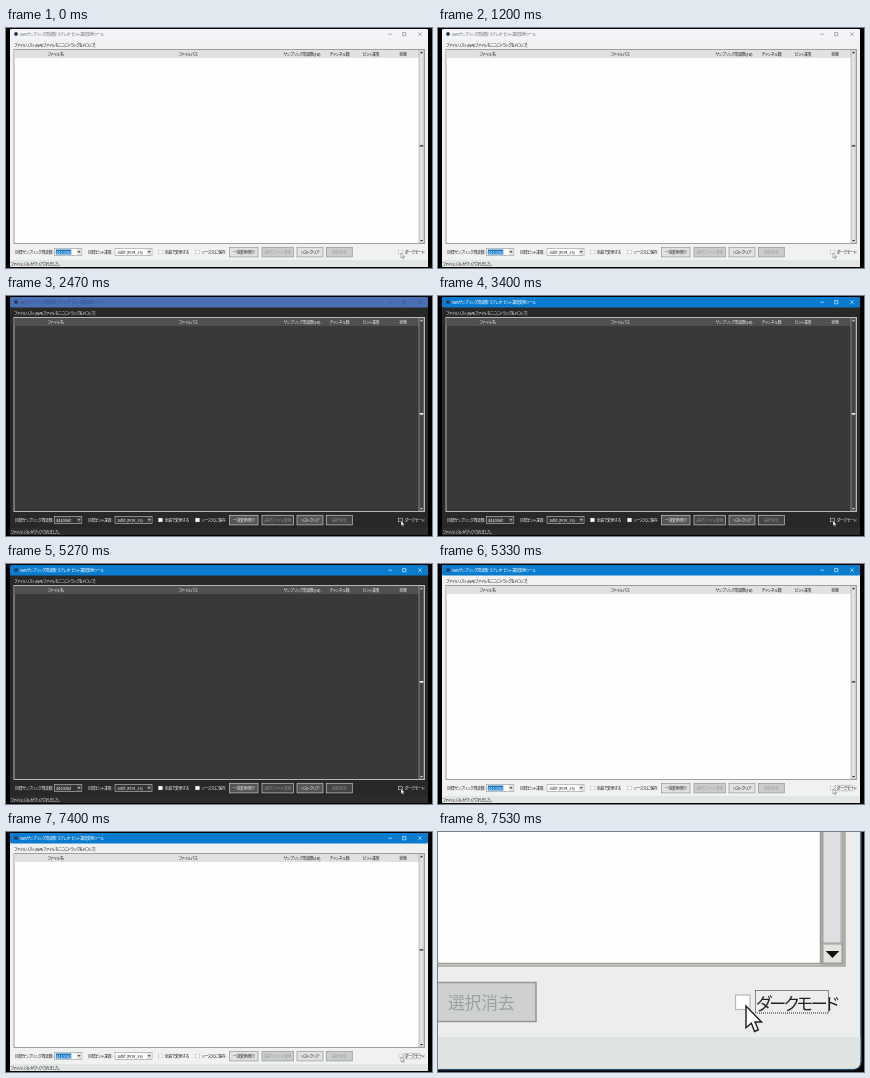
Animation of 426x240 px, one loop 8000 ms. Source, as an HTML page:

```html
<!DOCTYPE html>
<html lang="ja">
<head>
<meta charset="utf-8">
<style>
html, body { margin: 0; width: 100%; height: 100%; overflow: hidden; background: #000; }
svg { display: block; width: 100vw; height: 100vh;
  --bar: #f2f4f7; --barText: #777; --bg: #eff2f0; --ink: #222; --status: #e2e7e4;
  --list: #fefefc; --head: #e0e2e1; --edge: #969996; --scroll: #dfe1df; --thumb: #555;
  --field: #fff; --pick: #1679c9; --pickText: #fff; --button: #e0e2e1; --off: #cbcdcb; --offText: #9ca09d;
  --box: #fff; --boxEdge: #b4b7b4; --arrow: #222; }
svg.active { --bar: #0a7ccf; --barText: #fff; }
svg.dark { --bg: #282828; --ink: #eee; --status: #2c2c2c;
  --list: #393939; --head: #505050; --edge: #c4c4c4; --scroll: #454545; --thumb: #eee;
  --field: #333; --pick: #444; --pickText: #eee; --button: #555; --off: #444; --offText: #8a8a8a;
  --box: #fff; --boxEdge: #ddd; --arrow: #ddd; }
svg.fading { --bar: #4a6fb4; --barText: #35538c; }
text { font-family: "Noto Sans CJK JP", "Noto Sans CJK", sans-serif; font-feature-settings: "palt";
  dominant-baseline: central; white-space: pre; }
</style>
</head>
<body>
<svg viewBox="0 0 426 240" preserveAspectRatio="none"><g id="full"></g><g id="close"></g></svg>
<script>
const svg = document.querySelector('svg');
const full = document.getElementById('full');
const close = document.getElementById('close');
const v = name => name[0] === '#' || name === 'none' ? name : `var(--${name})`;

const rect = (x, y, w, h, fill, stroke = 'none', sw = .7, more = '') =>
  `<rect x="${x}" y="${y}" width="${w}" height="${h}" fill="${v(fill)}" stroke="${v(stroke)}" stroke-width="${sw}" ${more}/>`;
const text = (x, y, s, fill = 'ink', anchor = 'start', size = 4, gap = -.09) =>
  `<text x="${x}" y="${y}" fill="${v(fill)}" text-anchor="${anchor}" font-size="${size}" letter-spacing="${gap * size}">${s}</text>`;
const path = (d, fill, stroke = 'none', sw = .6) =>
  `<path d="${d}" fill="${v(fill)}" stroke="${v(stroke)}" stroke-width="${sw}"/>`;
const down = (x, y, r, fill) => path(`M${x - r} ${y - r / 2}h${2 * r}l${-r} ${r}z`, fill);
const pointer = (x, y, k) =>
  `<g transform="translate(${x} ${y}) scale(${k})">${path('M0 0V5.3L1.3 4.2L2.1 6.2L3 5.8L2.2 3.9H3.8Z', '#fff', '#222', .35)}</g>`;
const focus = (x, y, w, h, sw) =>
  rect(x, y, w, h, 'none', '#222', sw, `stroke-dasharray="${sw} ${sw}"`);

const button = (x, w, label, on) =>
  rect(x, 219.3, w, 9.6, on ? 'button' : 'off', 'edge') +
  text(x + w / 2, 224, label, on ? 'ink' : 'offText', 'middle');
const check = (x, label, fill = 'box') =>
  rect(x - 1.8, 222.2, 3.6, 3.6, fill, 'boxEdge', .5) + text(x + 4, 224, label);
const combo = (x, w, label, picked) =>
  rect(x, 220.4, w, 7.2, 'field', 'edge', .6) +
  (picked ? rect(x + 1.5, 221.5, 15.5, 5, 'pick') : '') +
  text(x + 2, 224, label, picked ? 'pickText' : 'ink', 'start', 3.8, -.02) +
  rect(x + w - 5, 221, 4.5, 6, 'scroll') + down(x + w - 2.8, 224, 1.5, 'arrow');

const columns = [[49.5, 'ファイル名'], [182, 'ファイルパス'], [296, 'サンプリング周波数 (Hz)'],
  [333.5, 'チャンネル数'], [365, 'ビット深度'], [397, '状態']];

full.innerHTML = [
  rect(4, 1, 418, 238, 'bg', 'none', 0, 'rx="1.5"'),
  rect(4, 1, 418, 10.5, 'bar', 'none', 0, 'rx="1.5"'),
  '<circle cx="10" cy="6" r="1.9" fill="#263b55"/>',
  text(14, 6.2, 'WAVサンプリング周波数・ステレオ・ビット深度変換ツール', 'barText', 'start', 4, -.12),
  path('M382.5 6.2h3.4M396.7 4.6h3.2v3.2h-3.2zM412.4 4.5l3.4 3.4m0-3.4l-3.4 3.4', 'none', 'barText', .6),
  text(8, 17, 'ファイルリスト (WAVファイルをここにドラッグ＆ドロップ)', 'ink', 'start', 4, -.11),
  rect(8, 21.5, 410.5, 194, 'list', 'edge', .9),
  rect(8.5, 22, 404.5, 8, 'head'),
  ...columns.map(([x, s]) => text(x, 26, s, 'ink', 'middle')),
  rect(413, 22, 5, 193, 'scroll', 'edge', .5),
  path('M414 25.3h3l-1.5-1.7z', 'arrow'),
  down(415.5, 212.8, 1.5, 'arrow'),
  rect(413.7, 117, 3.6, 1.7, 'thumb'),
  text(9, 224, '目標サンプリング周波数:'),
  combo(48.3, 27.5, '44100Hz', true),
  text(82, 224, '目標ビット深度:'),
  combo(109, 37, '16bit (PCM_16)', false),
  check(154.5, '全曲で変更する'),
  check(191.5, 'ソース元に保存'),
  button(223.5, 28.5, '一括変換実行', true),
  button(256, 31.5, '選択ファイル変換', false),
  button(291, 26, 'リストクリア', true),
  button(320.3, 26, '選択消去', false),
  check(394.5, 'ダークモード', 'field'),
  `<g id="focus">${focus(397.4, 221.4, 17.2, 5.4, .4)}</g>`,
  rect(4, 232, 418, 7, 'status'),
  text(4.5, 236, 'ファイルリストがクリアされました。', 'ink', 'start', 4, -.14),
  pointer(395, 224.8, .95)
].join('');

close.innerHTML = [
  rect(0, 0, 426, 240, '#000'),
  rect(-20, -20, 443, 257.5, '#eceeec', '#244f70', 1.5, 'rx="8"'),
  path('M0 205H422.3V229.5Q422.3 236.8 415 236.8H0Z', '#dfe4e1'),
  rect(-5, -5, 412, 139, '#d8dad5', '#a3a69d', 1.5),
  rect(-5, -5, 387.5, 136.5, '#fefefc', '#999c94', 1.5),
  rect(384, -5, 21, 137, '#cfd1ce', '#999c96', 1.5),
  rect(385, -5, 18, 116, '#dddfe0', '#a2a4a2', 1),
  rect(385, 112, 19, 19, '#e2e4e2', '#999c96', 1),
  down(394.5, 122.5, 6.8, '#111'),
  rect(-5, 150.5, 103, 39, '#cfd1cf', '#929592', 1.5),
  text(10, 170, '選択消去', '#9da29f', 'start', 16.8, -.01),
  rect(297.5, 163, 14.5, 14.5, '#fff', '#b5b8b5', 1.2),
  text(318, 170, 'ダークモード', '#222', 'start', 17, -.13),
  focus(317.5, 158.5, 73, 22.5, 1),
  pointer(308, 174, 4.1)
].join('');

const ring = document.getElementById('focus');
const start = performance.now();

function draw(now) {
  const t = Math.max(0, now - start) % 8000;
  const dark = t >= 2470 && t < 5330;
  const fading = t >= 2470 && t < 2530;
  svg.setAttribute('class', [t >= 2470 && 'active', dark && 'dark', fading && 'fading'].filter(Boolean).join(' '));
  ring.style.display = t >= 5330 ? '' : 'none';
  close.style.display = t >= 7470 ? '' : 'none';
  requestAnimationFrame(draw);
}
draw(start);
</script>
</body>
</html>
```
